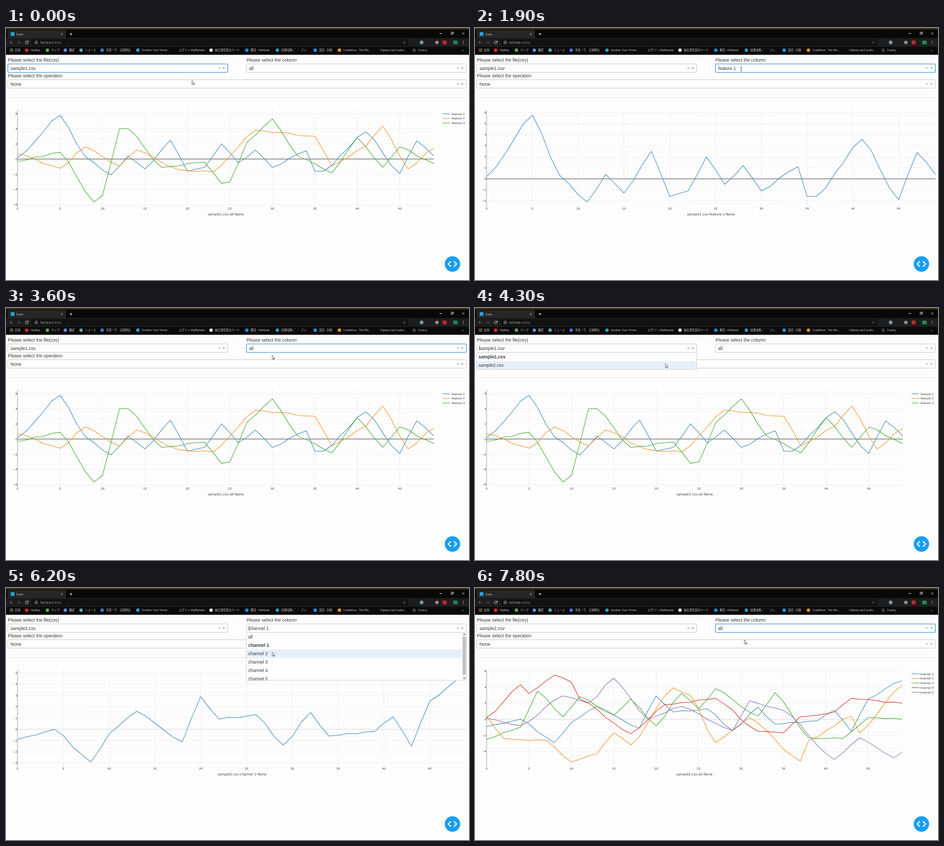
These frames come from a looping animation (880x480 px, 8000 ms). An HTML page with a canvas:

```html
<!DOCTYPE html>
<html lang="en">
<head>
<meta charset="utf-8">
<title>Dash</title>
<style>
html, body { margin: 0; width: 100%; height: 100%; overflow: hidden; background: #fdfdfd; }
canvas { display: block; width: 880px; height: 480px; }
</style>
</head>
<body>
<canvas id="stage" width="880" height="480"></canvas>
<script>
const ctx = document.getElementById('stage').getContext('2d');
const LOOP = 8000, STEP = 100, SAMPLES = 50;
const PAGE = '#fdfdfd', INK = '#3c3c3c', BORDER = '#cccccc', FOCUS = '#3d93c8', HOVER = '#e6f0fc', PALE = '#d4d4d4';
const ARIAL = '"Liberation Sans", Arial, sans-serif';
const PLOT = '"DejaVu Sans", sans-serif';
const CHROME = '"Noto Sans", "Noto Sans CJK JP", "Noto Sans CJK", sans-serif';
const COLORS = ['#3f8abc', '#f59124', '#45ad35', '#cf3526', '#9470b5'];

// A noisy signal through its main turning points [index, value]
function signal(seed, ...turns) {
  const random = () => (seed = seed * 16807 % 2147483647) / 2147483647;
  return Array.from({ length: SAMPLES }, (_, i) => {
    const next = Math.max(1, turns.findIndex(turn => turn[0] >= i));
    const [i0, v0] = turns[next - 1], [i1, v1] = turns[next];
    const k = (i - i0) / (i1 - i0);
    const ease = (k + k * k * (3 - 2 * k)) / 2;
    return v0 + (v1 - v0) * ease + (random() - .5) * k * (1 - k);
  });
}

const FILES = [
  { name: 'sample1.csv', label: 'feature', right: 813, zero: '#505050', series: [
    signal(11, [0, .2], [5, 5.78], [8, .3], [11, -2.1], [13, .4], [15, -1.3], [18, 2.5], [20, -1.6], [22, -1.1], [24, 2],
      [26, -.5], [28, 1.2], [30, -1.1], [34, 1.1], [35, -1.6], [36, -1.6], [41, 3.6], [45, -1.9], [47, 2.4], [49, .4]),
    signal(22, [0, .7], [5, -1.2], [8, 1.6], [12, -.9], [14, 1.2], [19, -1.4], [23, -1.7], [28, 3.8], [35, 3],
      [37, -.9], [41, 1.7], [43, 4.35], [46, -1.3], [49, 1.4]),
    signal(33, [0, -.3], [5, .9], [9, -5.65], [10, -4.8], [12, 4], [13, 4], [17, -1.1], [22, -.4], [24, -3.2],
      [25, -3], [27, 2.2], [30, 5.3], [33, .4], [37, -1.8], [40, 2.8], [43, -1.1], [45, 1.6], [49, -.6])
  ] },
  { name: 'sample2.csv', label: 'channel', right: 811.8, zero: '#dadada', series: [
    signal(44, [0, -.9], [4, 0], [8, -2.9], [10, -.4], [13, 1.6], [18, -1.1], [20, 2.9], [22, .9], [26, 1.3],
      [29, -1.4], [32, 1.5], [34, -.6], [39, -.2], [41, 1.1], [43, -1.5], [45, 2.5], [49, 4.8]),
    signal(55, [0, .4], [2, -2.4], [7, -2.6], [10, -5.3], [13, -4.3], [15, -1.7], [17, -3.2], [22, 3.9], [24, 3],
      [27, -2.9], [31, .2], [37, -5.2], [38, -2.6], [43, .4], [44, -1.7], [49, 4.2]),
    signal(66, [0, -2.5], [4, -1], [6, 3.5], [9, .3], [11, 2.8], [15, .5], [17, 2.5], [20, -.8], [23, 3.2], [25, 1.3],
      [27, 3.8], [32, .4], [34, 3.3], [38, -2.3], [42, -2.4], [45, .2], [49, 0]),
    signal(77, [0, .2], [4, 4.3], [5, 3.2], [8, 5.47], [10, 4.6], [11, 2.5], [17, -1.8], [21, 1.8], [27, 2.6],
      [32, -1.5], [35, -1.7], [37, .3], [41, .9], [43, 2.6], [49, 2]),
    signal(88, [0, .1], [4, -.8], [9, 2.9], [12, 2], [15, 5.1], [19, 0], [23, 1.6], [29, -1.4], [31, 2.3],
      [35, 1.1], [41, -5], [44, -2.3], [48, -4.8], [49, -4.1])
  ] }
];

const ACTIONS = [
  { menu: 'column', opens: 1200, picks: 1500, choice: 1 },
  { menu: 'column', opens: 2000, picks: 2300, choice: 2 },
  { menu: 'column', opens: 2400, picks: 2700, choice: 3 },
  { menu: 'column', opens: 3300, picks: 3600, choice: 0 },
  { menu: 'file', opens: 4100, picks: 4400, choice: 1 },
  { menu: 'column', opens: 5000, picks: 5400, choice: 1 },
  { menu: 'column', opens: 6000, picks: 6300, choice: 2 },
  { menu: 'column', opens: 7000, picks: 7500, choice: 0 }
];

// [time, x, y]: resting places, plus reaching and using each menu
const POINTER = [[0, 353.5, 100], [100, 353.5, 100], [500, 434, 97], [600, 434, 97],
  [2900, 424.5, 94], [7800, 512, 99], [LOOP, 512, 99]];
ACTIONS.forEach(({ menu, opens, picks, choice }, i) => {
  const x = menu === 'file' ? 362 : 506, row = 90 + 16 * choice;
  const free = i ? ACTIONS[i - 1].picks + 100 : 0;
  POINTER.push([Math.max(free, opens - 400), x, 78], [opens, x, 78], [picks - 200, x, row], [picks, x, row]);
});
POINTER.sort((a, b) => a[0] - b[0]);

function rect(x, y, w, h, color) {
  ctx.fillStyle = color;
  ctx.fillRect(x, y, w, h);
}

function circle(x, y, r, color) {
  ctx.fillStyle = color;
  ctx.beginPath();
  ctx.arc(x, y, r, 0, 2 * Math.PI);
  ctx.fill();
}

function line(points, color, width = 1) {
  ctx.strokeStyle = color;
  ctx.lineWidth = width;
  ctx.beginPath();
  points.forEach(([x, y]) => ctx.lineTo(x, y));
  ctx.stroke();
}

function polygon(points, color) {
  ctx.fillStyle = color;
  ctx.beginPath();
  points.forEach(([x, y]) => ctx.lineTo(x, y));
  ctx.closePath();
  ctx.fill();
}

// Small triangle, dir 1 points down and -1 up
function caret(x, y, dir, color) {
  polygon([[x - 2.3, y - dir], [x + 2.3, y - dir], [x, y + 1.4 * dir]], color);
}

function text(string, x, y, size, color = INK, family = ARIAL, align = 'left', weight = '') {
  ctx.font = `${weight} ${size}px ${family}`;
  ctx.textAlign = align;
  ctx.fillStyle = color;
  ctx.fillText(string, x, y);
}

function cross(x, y, r, color) {
  line([[x - r, y - r], [x + r, y + r]], color, .8);
  line([[x - r, y + r], [x + r, y - r]], color, .8);
}

function drawTabs() {
  rect(0, 0, 880, 19, '#080808');
  rect(0, 0, 880, 3, '#3a2e14');
  rect(3, 4, 111, 15, '#262626');
  rect(9, 8, 7, 7, '#22a0e0');
  text('Dash', 20, 13.6, 5.4, PALE, CHROME);
  cross(106, 11.5, 1.7, PALE);
  line([[121, 11.5], [126, 11.5]], PALE);
  line([[123.5, 9], [123.5, 14]], PALE);
  line([[824, 10.5], [829, 10.5]], PALE);
  ctx.lineWidth = .8;
  ctx.strokeRect(846, 9, 3.2, 3.2);
  line([[847.3, 9], [847.3, 7.7], [850.5, 7.7], [850.5, 11], [849.2, 11]], PALE, .8);
  cross(869, 10.5, 2.2, PALE);
}

function drawToolbar() {
  rect(0, 19, 880, 17, '#1d1d1d');
  rect(48, 21, 717, 13, '#121212');
  for (const [x, dir, color] of [[10, -1, '#777'], [24, 1, '#555']]) {
    line([[x - 3, 27.5], [x + 3, 27.5]], color, .9);
    line([[x, 24.7], [x + 3 * dir, 27.5], [x, 30.3]], color, .9);
  }
  ctx.strokeStyle = PALE;
  ctx.beginPath();
  ctx.arc(39.5, 27.5, 2.7, .3, 5.4);
  ctx.stroke();
  polygon([[40, 27], [43, 27], [43, 24]], PALE);
  ctx.lineWidth = .7;
  ctx.beginPath();
  ctx.arc(57.5, 27.5, 2.7, 0, 2 * Math.PI);
  ctx.stroke();
  rect(57.1, 27, .8, 2, PALE);
  rect(57.1, 25.8, .8, .8, PALE);
  text('127.0.0.1', 65, 29.7, 5.9, '#eee', CHROME);
  text(':8050', 90.2, 29.7, 5.9, '#888', CHROME);
  text('☆', 757, 30.2, 7.5, PALE, PLOT, 'center');
  circle(790, 27.5, 3.4, '#7d9db0');
  circle(819, 27.5, 3.2, '#929292');
  rect(830, 24, 7.5, 7, '#d42030');
  rect(850, 24, 8.5, 7, '#178a58');
  for (const y of [25, 27.5, 30]) circle(869, y, .7, PALE);
}

function drawBookmarks() {
  rect(0, 36, 880, 15, '#0a0a0a');
  for (let i = 0; i < 9; i++)
    rect(7.2 + i % 3 * 2.2, 39.2 + Math.floor(i / 3) * 2.2, 1.5, 1.5, ['#d65a4c', '#60b060', '#d8b840'][i % 3]);
  const bookmarks = [
    [17, '应用'], [46.5, 'ClipBay', '#e02828'], [86, 'マップ', '#56a85c'], [120, '翻訳', '#5a91d8'],
    [150, 'ニュース', '#62a6b0'], [190, '寻觅一下、立刻明白', '#4c73d4'], [258, 'Zumble: Your Home...', '#2ca0c8'],
    [329, 'ログイン-MyWaseda'], [397, '緑丘研究室のページ', '#e8e8e8'], [465, '概览 - FileNook', '#1b8fd5'],
    [523, '咕噜咕噜 ( ゜- ゜)つ...', '#25a2bc'], [595, '首页 - 问谷', '#2196e4'],
    [641, 'CodeMoss - The Wo...', '#df9a28'], [711, 'Clipbay mp3 audio...'], [783, 'Codary', '#404040']
  ];
  for (const [x, name, color] of bookmarks) {
    if (color) circle(x - 7.3, 42.2, 3.2, color);
    text(name, x, 44.2, 5.2, PALE, CHROME);
  }
  text('»', 866.5, 44, 6, PALE, CHROME);
}

function drawSelect(x, y, right, value, open, focused) {
  const active = focused && !open;
  rect(x, y, right - x, 16, PAGE);
  ctx.strokeStyle = active ? FOCUS : BORDER;
  ctx.lineWidth = active ? 1.2 : 1;
  ctx.beginPath();
  ctx.roundRect(x, y, right - x, 16, 1.8);
  ctx.stroke();
  text(value, x + 5, y + 11, 8.6);
  if (open) rect(x + 4.5, y + 3.5, .8, 9, INK);
  cross(right - 16, y + 8, 1.5, '#888');
  caret(right - 7.5, y + 8, open ? -1 : 1, '#888');
}

function drawMenu(x, right, options, selected, pointerY) {
  const top = 85, row = 16, height = Math.min(options.length * row, 91);
  const hovered = pointerY < top ? selected : Math.floor((pointerY - top) / row);
  ctx.save();
  ctx.beginPath();
  ctx.rect(x, top, right - x, height);
  ctx.clip();
  rect(x, top, right - x, height, PAGE);
  options.forEach((name, i) => {
    if (i === hovered) rect(x, top + i * row, right - x, row, HOVER);
    text(name, x + 3.3, top + 10.8 + i * row, 8.6, INK, ARIAL, 'left', i === selected ? 'bold' : '');
  });
  if (options.length * row > height) {
    rect(right - 8, top, 8, height, '#f1f1f1');
    rect(right - 7, 93, 6, 72, '#c1c1c1');
    caret(right - 4, 88.5, -1, '#666');
    caret(right - 4, 172, 1, '#666');
  }
  ctx.restore();
  line([[x, top], [x, top + height], [right, top + height], [right, top]], BORDER, .8);
}

function drawChart(file, column, options) {
  const all = column === 0;
  const series = all ? file.series : [file.series[column - 1]];
  const values = series.flat();
  const min = Math.min(...values), max = Math.max(...values), span = max - min;
  const left = 22, right = all ? file.right : 875, top = 156.5, bottom = 341;
  const px = i => left + i * (right - left) / (SAMPLES - 1);
  const py = v => 166.1 + (max - v) / span * 165.2;
  const tick = span > 9 ? 2 : 1;

  for (let i = 0; i < SAMPLES; i += 5) {
    line([[px(i), top], [px(i), bottom]], i ? '#ececf0' : '#888', .8);
    text(i, px(i), 346, 5.5, INK, PLOT, 'center');
  }
  const first = Math.ceil((min - span / 16) / tick) * tick;
  for (let v = first; v <= max + span / 16; v += tick) {
    line([[left, py(v)], [right, py(v)]], v ? '#eeeef2' : file.zero, v ? .8 : 1);
    text(String(v).replace('-', '−'), 21.5, py(v) + 2, 5.5, INK, PLOT, 'right');
  }
  ctx.lineJoin = 'round';
  series.forEach((data, i) => {
    line(data.map((v, k) => [px(k), py(v)]), COLORS[i], 1.05);
    if (!all) return;
    const y = 163.5 + 8.75 * i;
    line([[830, y], [843.8, y]], COLORS[i], 1.05);
    text(options[i + 1], 872, y + 2, 5.5, INK, PLOT, 'right');
  });
  ctx.lineJoin = 'miter';
  text(`${file.name}-${options[column]}-None`, (left + right) / 2, 357.2, 6.42, INK, PLOT, 'center');
}

function drawPointer(x, y) {
  const dark = '#333';
  if (y > 68 && y < 85) {
    line([[x, y - 4], [x, y + 4]], dark, .7);
    for (const end of [-4, 4]) line([[x - 1.6, y + end], [x + 1.6, y + end]], dark, .7);
    return;
  }
  const arrow = [[0, 0], [0, 7.6], [1.8, 6], [3, 8.7], [4.2, 8.2], [3, 5.6], [5.3, 5.5]].map(([dx, dy]) => [x + dx, y + dy]);
  polygon(arrow, '#fff');
  line([...arrow, arrow[0]], dark, .7);
}

function pointerAt(t) {
  const next = Math.max(1, POINTER.findIndex(key => key[0] >= t));
  const [t0, x0, y0] = POINTER[next - 1], [t1, x1, y1] = POINTER[next];
  const k = (t - t0) / (t1 - t0);
  return [x0 + (x1 - x0) * k, y0 + (y1 - y0) * k];
}

function stateAt(t) {
  const state = { file: 0, column: 0, open: '', focus: 'file' };
  for (const { menu, opens, picks, choice } of ACTIONS) {
    if (t < opens) break;
    state.focus = menu;
    state.open = t < picks ? menu : '';
    if (!state.open) state[menu] = choice;
  }
  return state;
}

function draw(now) {
  const t = Math.floor(now % LOOP / STEP) * STEP;
  const state = stateAt(t), file = FILES[state.file];
  const options = ['all', ...file.series.map((_, i) => `${file.label} ${i + 1}`)];
  const [x, y] = pointerAt(t);

  rect(0, 0, 880, 480, PAGE);
  drawTabs();
  drawToolbar();
  drawBookmarks();
  text('Please select the file(csv)', 3.5, 64.2, 8.6);
  text('Please select the column', 457, 64.2, 8.6);
  text('Please select the operation', 3.5, 94.4, 8.6);
  drawSelect(3.5, 98.5, 875, 'None');
  line([[3.5, 132.5], [875, 132.5]], '#e1e1e1');
  drawChart(file, state.column, options);
  drawSelect(3.5, 68.5, 421.5, file.name, state.open === 'file', state.focus === 'file');
  drawSelect(457, 68.5, 875, options[state.column], state.open === 'column', state.focus === 'column');
  if (state.open === 'file') drawMenu(3.5, 421.5, FILES.map(f => f.name), state.file, y);
  if (state.open === 'column') drawMenu(457, 875, options, state.column, y);

  circle(848.5, 449.5, 14.7, '#1a9ff0');
  for (const dir of [-1, 1]) {
    const cx = 848.5 + 3 * dir;
    line([[cx, 444.5], [cx + 5 * dir, 449.5], [cx, 454.5]], '#fff', 2);
  }
  drawPointer(x, y);
}

const start = performance.now();
function loop() {
  draw(performance.now() - start);
  requestAnimationFrame(loop);
}
loop();
</script>
</body>
</html>
```
